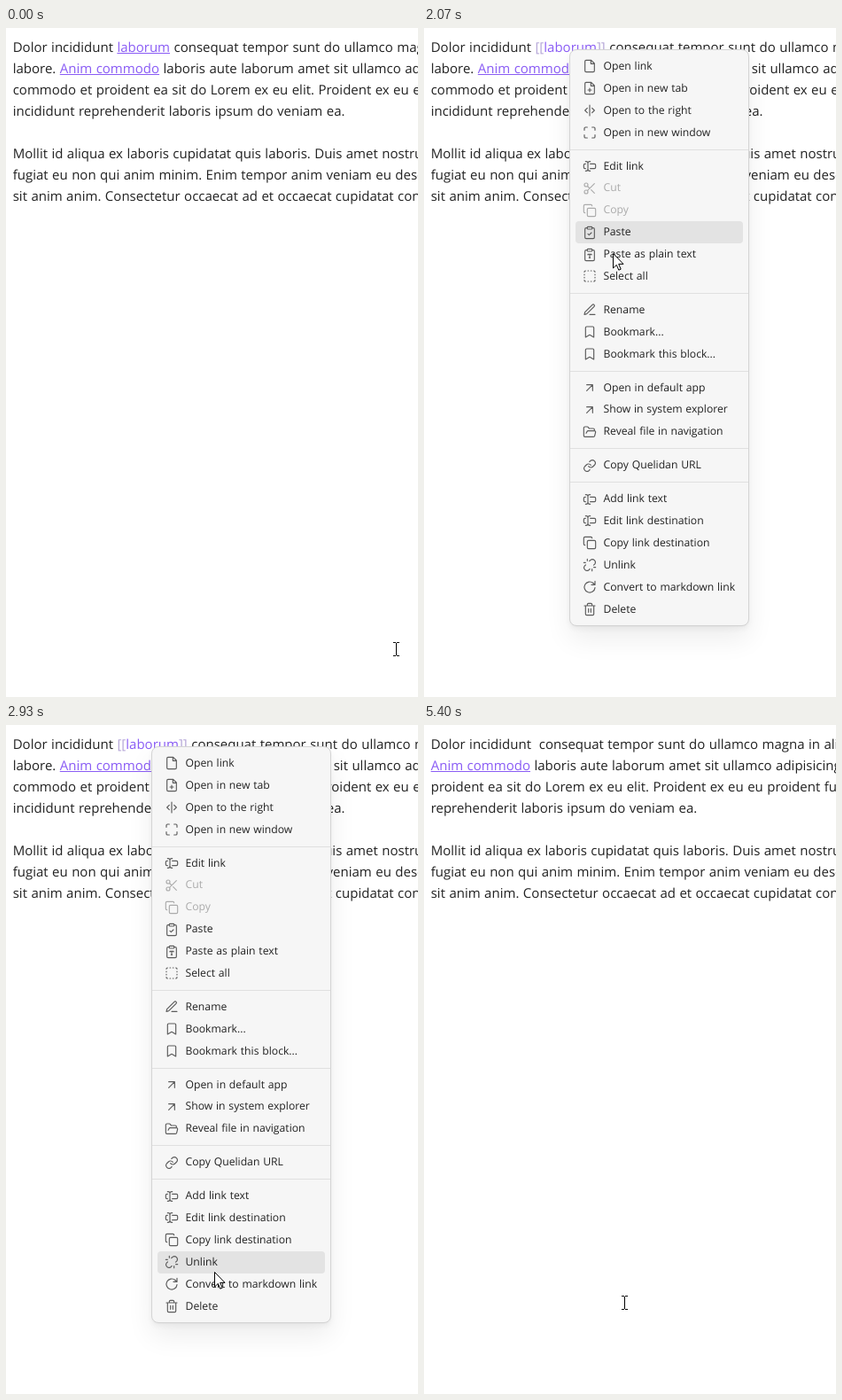
An HTML page that plays this animation: 465 px wide and 755 px high, repeating every 5.47 s.

```html
<!DOCTYPE html>
<html lang="en">
<head>
<meta charset="utf-8">
<title>Link context menu</title>
<style>
  html, body { margin: 0; width: 100%; height: 100%; overflow: hidden; background: #fff; }
  body { position: relative; color: #222; font-family: "Open Sans", "Noto Sans", sans-serif; text-rendering: geometricPrecision; }
  #page { position: absolute; left: 7.7px; top: 10px; font-size: 15px; line-height: 24px; word-spacing: .55px; white-space: pre; }
  .link { color: #8a5cf5; text-decoration: underline 1px; text-underline-offset: 1px; }
  .raw { color: #8a5cf5; }
  .hot { color: #9873f7; text-decoration: underline 1px; text-underline-offset: 1px; }
  .mark { color: #b5a6d8; }
  #caret { position: absolute; top: 10px; width: 1px; height: 21px; background: #222; }
  #menu {
    position: absolute; left: 164px; top: 24px; width: 203px; height: 651px; box-sizing: border-box;
    padding: 6px 0; border: 1px solid #d4d4d4; border-radius: 8px; background: #f6f6f6;
    font-size: 12.2px; word-spacing: .6px; white-space: pre;
    box-shadow: 0 1px 2px rgba(0,0,0,.028), 0 3.4px 6.7px rgba(0,0,0,.042), 0 15px 30px rgba(0,0,0,.07);
  }
  .row { display: flex; align-items: center; height: 24.9px; line-height: 24.9px; margin: 0 6px; padding-left: 8px; border-radius: 4px; }
  .row svg { width: 16px; height: 16px; margin-right: 7.5px; fill: none; stroke: #5c5c5c; stroke-width: 1.75; stroke-linecap: round; stroke-linejoin: round; }
  .row.off { color: #ababab; }
  .row.off svg { stroke: #ababab; }
  .row.on { background: #e3e3e3; }
  .rule { height: 1px; margin: 6px 0; background: #e0e0e0; }
  #pointer { position: absolute; left: 0; top: 0; width: 100%; height: 100%; }
  #pointer path { stroke: #000; fill: #fff; }
</style>
</head>
<body>
<div id="page"></div>
<div id="caret"></div>
<div id="menu"></div>
<svg id="pointer"><path/></svg>
<script>
const LOOP = 5470, STEP = 1000 / 15;
const $ = id => document.getElementById(id);
const page = $('page'), caret = $('caret'), menu = $('menu');
const pointer = document.querySelector('#pointer path');

const FILE = 'M14.5 2H6a2 2 0 0 0-2 2v16a2 2 0 0 0 2 2h12a2 2 0 0 0 2-2V7.5zM14 2v6h6';
const CLIPBOARD = 'M9 2h6a1 1 0 0 1 1 1v2a1 1 0 0 1-1 1H9a1 1 0 0 1-1-1V3a1 1 0 0 1 1-1zM16 4h2a2 2 0 0 1 2 2v14a2 2 0 0 1-2 2H6a2 2 0 0 1-2-2V6a2 2 0 0 1 2-2h2';
const icons = {
  file: FILE,
  filePlus: FILE + 'M12 18v-6M9 15h6',
  split: 'M12 3v18M8 8l-4 4 4 4M16 16l4-4-4-4',
  corners: 'M8 3H5a2 2 0 0 0-2 2v3M21 8V5a2 2 0 0 0-2-2h-3M3 16v3a2 2 0 0 0 2 2h3M16 21h3a2 2 0 0 0 2-2v-3',
  input: 'M5 4h1a3 3 0 0 1 3 3 3 3 0 0 1 3-3h1M13 20h-1a3 3 0 0 1-3-3 3 3 0 0 1-3 3H5M5 16H4a2 2 0 0 1-2-2v-4a2 2 0 0 1 2-2h1M13 8h7a2 2 0 0 1 2 2v4a2 2 0 0 1-2 2h-7M9 7v10',
  scissors: 'M9 6a3 3 0 1 1-6 0 3 3 0 0 1 6 0zM9 18a3 3 0 1 1-6 0 3 3 0 0 1 6 0zM20 4L8.1 15.9M14.5 14.5L20 20M8.1 8.1L12 12',
  copy: 'M10 8h10a2 2 0 0 1 2 2v10a2 2 0 0 1-2 2H10a2 2 0 0 1-2-2V10a2 2 0 0 1 2-2zM4 16c-1.1 0-2-.9-2-2V4c0-1.1.9-2 2-2h10c1.1 0 2 .9 2 2',
  paste: CLIPBOARD + 'M9 14l2 2 4-4',
  pasteText: CLIPBOARD + 'M9 12v-1h6v1M11 17h2M12 11v6',
  dashed: 'M5 3a2 2 0 0 0-2 2M19 3a2 2 0 0 1 2 2M21 19a2 2 0 0 1-2 2M5 21a2 2 0 0 1-2-2M9 3h1M9 21h1M14 3h1M14 21h1M3 9v1M21 9v1M3 14v1M21 14v1',
  pen: 'M12 20h9M16.5 3.5a2.1 2.1 0 0 1 3 3L7 19l-4 1 1-4z',
  bookmark: 'M19 21l-7-4-7 4V5a2 2 0 0 1 2-2h10a2 2 0 0 1 2 2z',
  arrow: 'M7 7h10v10M7 17L17 7',
  folder: 'M6 14l1.5-2.9A2 2 0 0 1 9.2 10H20a2 2 0 0 1 1.9 2.5l-1.5 6a2 2 0 0 1-2 1.5H4a2 2 0 0 1-2-2V5a2 2 0 0 1 2-2h3.9a2 2 0 0 1 1.7.9l.8 1.2a2 2 0 0 0 1.7.9H18a2 2 0 0 1 2 2v2',
  chain: 'M10 13a5 5 0 0 0 7.5.5l3-3a5 5 0 0 0-7-7l-1.8 1.7M14 11a5 5 0 0 0-7.5-.5l-3 3a5 5 0 0 0 7 7l1.7-1.7',
  unlink: 'M18.8 12.3l1.7-1.7a5 5 0 0 0-7-7l-1.8 1.7M5.2 11.8l-1.7 1.7a5 5 0 0 0 7 7l1.8-1.7M8 2v3M2 8h3M16 19v3M19 16h3',
  rotate: 'M21 2v6h-6M21 13a9 9 0 1 1-3-7.7L21 8',
  trash: 'M3 6h18M19 6v14a2 2 0 0 1-2 2H7a2 2 0 0 1-2-2V6M8 6V4a2 2 0 0 1 2-2h4a2 2 0 0 1 2 2v2M10 11v6M14 11v6'
};

const groups = [
  [['file', 'Open link'], ['filePlus', 'Open in new tab'], ['split', 'Open to the right'], ['corners', 'Open in new window']],
  [['input', 'Edit link'], ['scissors', 'Cut', 'off'], ['copy', 'Copy', 'off'], ['paste', 'Paste'],
   ['pasteText', 'Paste as plain text'], ['dashed', 'Select all']],
  [['pen', 'Rename'], ['bookmark', 'Bookmark...'], ['bookmark', 'Bookmark this block...']],
  [['arrow', 'Open in default app'], ['arrow', 'Show in system explorer'], ['folder', 'Reveal file in navigation']],
  [['chain', 'Copy Quelidan URL']],
  [['input', 'Add link text'], ['input', 'Edit link destination'], ['copy', 'Copy link destination'],
   ['unlink', 'Unlink'], ['rotate', 'Convert to markdown link'], ['trash', 'Delete']]
];
const rowHtml = ([icon, label, state = '']) =>
  `<div class="row ${state}"><svg viewBox="0 0 24 24"><path d="${icons[icon]}"/></svg>${label}</div>`;
menu.innerHTML = groups.map(g => g.map(rowHtml).join('')).join('<div class="rule"></div>');
const rows = [...menu.querySelectorAll('.row')];

const span = (cls, text) => `<span class="${cls}">${text}</span>`;

function pageHtml(mode, hovered) {
  const cls = (name, base) => hovered === name ? 'hot' : base;
  const anim = span(cls('anim', 'link'), 'Anim commodo');
  const word = {
    link: span(cls('word', 'link'), 'laborum'),
    raw: span('mark', '[[') + span(cls('word', 'raw'), 'laborum') + span('mark', ']]'),
    gone: ''
  }[mode];
  const first = `Dolor incididunt ${word} consequat tempor sunt do ullamco magna in aliqua`;
  const wrapped = mode === 'gone'
    ? [`${anim} laboris aute laborum amet sit ullamco adipisicing`,
       'proident ea sit do Lorem ex eu elit. Proident ex eu eu proident fugiat',
       'reprehenderit laboris ipsum do veniam ea.']
    : [`labore. ${anim} laboris aute laborum amet sit ullamco adipisicing`,
       'commodo et proident ea sit do Lorem ex eu elit. Proident ex eu eu proident',
       'incididunt reprehenderit laboris ipsum do veniam ea.'];
  return [first, ...wrapped, '',
    'Mollit id aliqua ex laboris cupidatat quis laboris. Duis amet nostrud',
    'fugiat eu non qui anim minim. Enim tempor anim veniam eu deserunt',
    'sit anim anim. Consectetur occaecat ad et occaecat cupidatat consequat'].join('\n');
}

// Mouse path: step, x, y
const path = [
  [0, 440, 701], [2, 408, 640], [5, 285, 395], [7, 208, 235], [9, 167, 147], [10, 167, 104], [11, 166, 71],
  [12, 166, 46], [13, 165, 30], [14, 164, 24], [25, 164, 24], [28, 184, 100], [31, 213, 254], [34, 228, 433],
  [35, 230, 477], [38, 233, 556], [43, 234, 607], [44, 235, 617], [49, 226, 659], [56, 226, 659],
  [57, 226, 660], [62, 226, 660], [63, 226, 652], [82, 226, 652]
];
function mouseAt(step) {
  const i = path.findIndex(p => p[0] > step);
  const [s0, x0, y0] = path[i - 1], [s1, x1, y1] = path[i];
  const u = (step - s0) / (s1 - s0);
  return [x0 + (x1 - x0) * u, y0 + (y1 - y0) * u];
}

const cursors = {
  beam: 'M-3-7.5H0M1-7.5H4M.5-7V7M-3 7.5H0M1 7.5H4',
  arrow: 'M.5.5V17L4.3 13.4 6.8 19.2 9.2 18.2 6.7 12.4H12z',
  hand: 'M-1.5 2a1.5 1.5 0 0 1 3 0V7.5l7.5 1.3a2.3 2.3 0 0 1 2 2.2v4.5l-2 3.5v3H-1v-2.5L-5.5 14a1.6 1.6 0 0 1 2.4-2l1.6 1.8zM1.5 7v4M5 8.3v3M8.2 9v2.6'
};

let shownPage = '';
function draw(step) {
  const [x, y] = mouseAt(step);
  const mode = step < 20 ? 'link' : step < 57 ? 'raw' : 'gone';
  const hovered = step > 25 ? '' : y < 34 ? 'word' : y < 58 ? 'anim' : '';
  const html = pageHtml(mode, hovered);
  if (html !== shownPage) page.innerHTML = shownPage = html;

  // The caret blinks every eight steps, starting over after each edit.
  const blinkStart = mode === 'raw' ? 20 : 57;
  caret.hidden = mode === 'link' || (step - blinkStart >> 3) % 2 === 1;
  caret.style.left = (mode === 'raw' ? 171 : 125) + 'px';

  const open = step >= 22 && step < 57;
  menu.style.visibility = open ? 'visible' : 'hidden';
  if (open) {
    // Row highlighting trails the mouse slightly.
    const rowY = mouseAt(step - .5)[1] - 25;
    for (const row of rows) {
      const inside = rowY >= row.offsetTop && rowY < row.offsetTop + 24.9;
      row.classList.toggle('on', step > 25 && inside && !row.classList.contains('off'));
    }
  }

  const shape = mode === 'link' && hovered ? 'hand' : step > 25 && step < 57 ? 'arrow' : 'beam';
  pointer.setAttribute('d', cursors[shape]);
  pointer.setAttribute('transform', `translate(${Math.round(x)} ${Math.round(y)})`);
}

function tick() {
  const time = performance.now() % LOOP;
  draw(Math.min(81, Math.floor((time + 5) / STEP)));
  requestAnimationFrame(tick);
}
tick();
</script>
</body>
</html>
```
